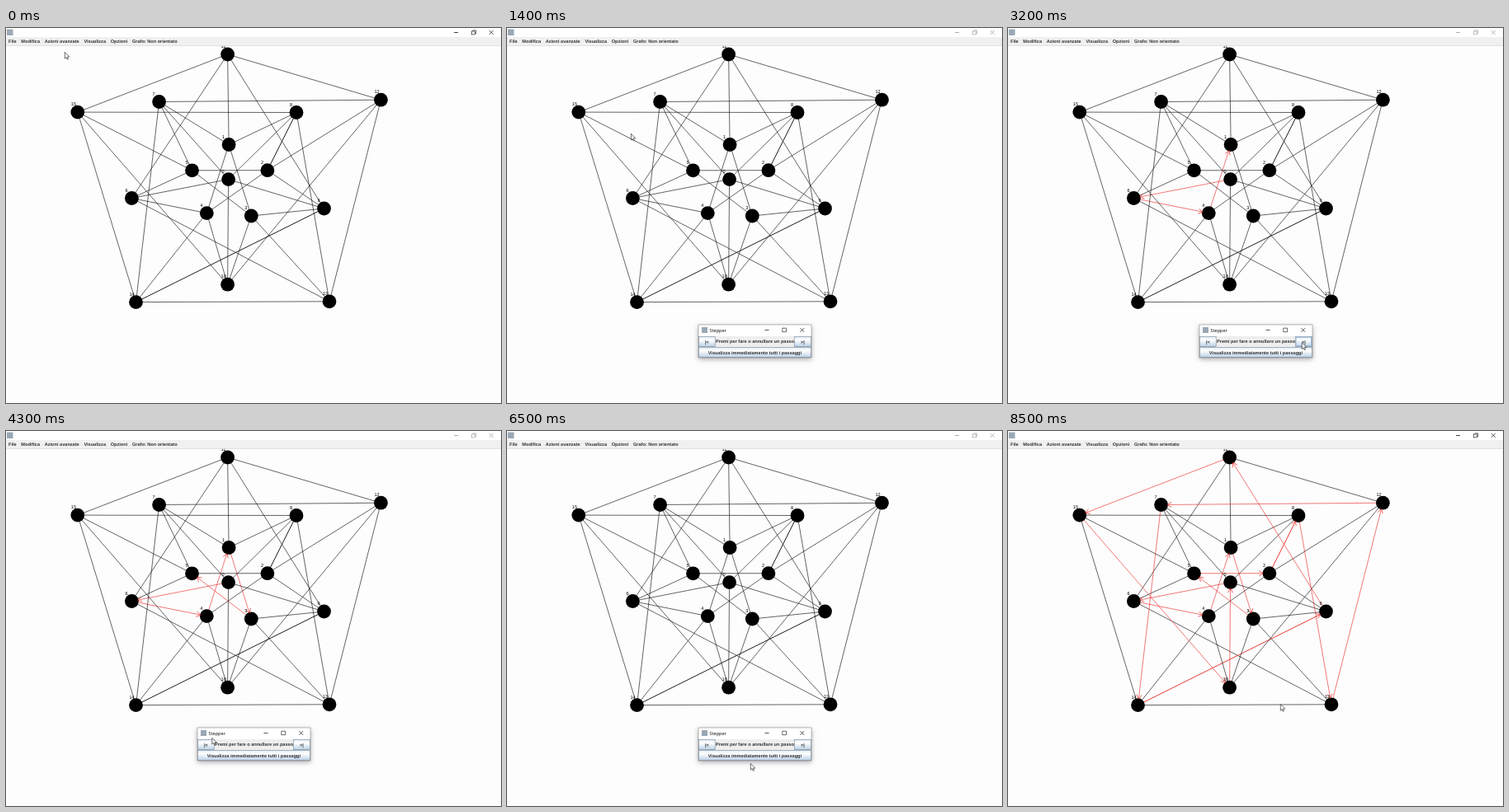
An HTML page with a canvas for the animation above (8.6 s loop, 600 px wide and 455 px high).

```html
<!DOCTYPE html>
<html lang="it">
<head>
<meta charset="utf-8">
<title>Grafo</title>
<style>
html, body { margin: 0; width: 100%; height: 100%; overflow: hidden; background: #fefdfe; }
canvas { display: block; width: 600px; height: 455px; }
</style>
</head>
<body>
<canvas id="stage"></canvas>
<script>
const W = 600, H = 455, LOOP = 8600, STEP = 100;
const canvas = document.getElementById('stage');
const ctx = canvas.getContext('2d');
const ratio = window.devicePixelRatio || 1;
canvas.width = W * ratio;
canvas.height = H * ratio;

const SANS = '"Liberation Sans", Arial, sans-serif';
const BOLD = `bold 5.6px ${SANS}`;
const PLAIN = `5.6px ${SANS}`;
const RED = '#e8302c', BLUE = '#a3b8cc', EDGE = '#7a8a99', ICON = '#9aa8b5';

// Hand-placed nodes: hub, inner ring, middle ring, outer ring
const nodes = [
  [269.6, 183.6],
  [270.1, 141.5], [316.9, 172.7], [297.3, 228], [243.3, 224.6], [225.5, 172.8],
  [152.4, 206.5], [185.6, 89.5], [352, 102.5], [385.5, 219], [268.6, 311.2],
  [268.6, 32], [454.4, 87.2], [392, 331.8], [157.5, 332.6], [86.8, 102.1]
];
const heavy = ['2-8', '9-14'];
const key = (a, b) => Math.min(a, b) + '-' + Math.max(a, b);
const edges = buildEdges();
const circuit = buildCircuit();

// [arrival time, x, y] of the pointer; every move takes at most MOVE ms
const MOVE = 600;
const stops = [
  [0, 71.3, 29.3], [300, 70, 16], [900, 78.3, 39.4], [1800, 356.3, 381.7], [4300, 249.8, 372.3],
  [4700, 242, 380], [6500, 295.3, 403.4], [6800, 318, 392], [7300, 362.3, 366.4], [8100, 330.3, 331.4]
];

const MENU = ['File', 'Modifica', 'Azioni avanzate', 'Visualizza', 'Opzioni', 'Grafo: Non orientato'];
const ITEMS = ['Aggiungi un nodo con un nome specifico', 'Trova circuito hamiltoniano',
  'Trova circuito euleriano', 'Trova il cammino più breve tra 2 nodi',
  'Controlla se bipartito', 'Trova arborescenza'];
const ROW = { top: 21.8, pitch: 11.65 };

const clamp = (v, lo, hi) => Math.max(lo, Math.min(hi, v));

// Each ring has five nodes; links repeat around the rings
function buildEdges() {
  const inner = i => 1 + i % 5, middle = i => 6 + i % 5, outer = i => 11 + i % 5;
  const list = [];
  for (let i = 0; i < 5; i++) {
    list.push(
      [0, middle(i)], [inner(i), inner(i + 2)], [outer(i), outer(i + 1)], [inner(i), outer(i)],
      [middle(i), inner(i + 3)], [middle(i), inner(i + 4)],
      [middle(i), outer(i)], [middle(i), outer(i + 2)]
    );
  }
  return list;
}

// Always walk on to the lowest unvisited neighbour, then return to the hub
function buildCircuit() {
  const walk = [0];
  for (;;) {
    const here = walk[walk.length - 1];
    const next = edges.filter(e => e.includes(here))
      .map(([a, b]) => a + b - here)
      .filter(n => !walk.includes(n));
    if (!next.length) return [...walk, 0];
    walk.push(Math.min(...next));
  }
}

// Five steps forward, five back, then the whole circuit
function shownSteps(t) {
  if (t >= 6800) return circuit.length - 1;
  const clicks = (start, gap) => clamp(Math.floor((t - start) / gap) + 1, 0, 5);
  return clicks(2200, 400) - clicks(4700, 300);
}

function pointerAt(t) {
  const i = stops.findIndex(s => s[0] >= t);
  if (i <= 0) return stops[i < 0 ? stops.length - 1 : 0].slice(1);
  const [t0, x0, y0] = stops[i - 1], [t1, x1, y1] = stops[i];
  const leave = Math.max(t0, t1 - MOVE);
  const u = clamp((t - leave) / (t1 - leave), 0, 1), k = u * u * (3 - 2 * u);
  return [x0 + (x1 - x0) * k, y0 + (y1 - y0) * k];
}

function fill(x, y, w, h, color) {
  ctx.fillStyle = color;
  ctx.fillRect(x, y, w, h);
}

function frame(x, y, w, h, color, width = 0.6) {
  ctx.strokeStyle = color;
  ctx.lineWidth = width;
  ctx.strokeRect(x, y, w, h);
}

function text(s, x, y, font = BOLD, color = '#333', align = 'left') {
  ctx.font = font;
  ctx.fillStyle = color;
  ctx.textAlign = align;
  ctx.fillText(s, x, y);
}

function path(points, color, width) {
  ctx.beginPath();
  points.forEach(([x, y]) => ctx.lineTo(x, y));
  ctx.strokeStyle = color;
  ctx.lineWidth = width;
  ctx.stroke();
}

function cross(x, y, r, color) {
  path([[x - r, y - r], [x + r, y + r]], color, 0.7);
  path([[x + r, y - r], [x - r, y + r]], color, 0.7);
}

function arrow(from, to) {
  const [ax, ay] = nodes[from], [bx, by] = nodes[to];
  const a = Math.atan2(by - ay, bx - ax);
  const tip = [bx - 7.5 * Math.cos(a), by - 7.5 * Math.sin(a)];
  const arm = d => [tip[0] - 6 * Math.cos(a + d), tip[1] - 6 * Math.sin(a + d)];
  path([arm(0.55), tip, arm(-0.55)], RED, 0.75);
}

function drawGraph(count) {
  const steps = circuit.slice(0, count).map((n, i) => [n, circuit[i + 1]]);
  const used = steps.map(([a, b]) => key(a, b));
  edges.forEach(([a, b]) => {
    const id = key(a, b);
    path([nodes[a], nodes[b]], used.includes(id) ? RED : '#111', heavy.includes(id) ? 0.95 : 0.65);
  });
  nodes.forEach(([x, y]) => {
    ctx.beginPath();
    ctx.arc(x, y, 8.4, 0, 2 * Math.PI);
    ctx.fillStyle = '#000';
    ctx.fill();
  });
  steps.forEach(([a, b]) => arrow(a, b));
  nodes.forEach(([x, y], i) => text(i, x - 8, y - 8, PLAIN, '#000'));
}

function drawWindow(active) {
  const ink = active ? '#111' : '#999';
  fill(0, 0, W, 11, '#fff');
  fill(1, 1.5, 7.5, 7.5, ICON);
  path([[543, 5.5], [548, 5.5]], ink, 0.8);
  frame(564.6, 4, 3.9, 3.9, ink);
  path([[565.9, 4], [565.9, 2.8], [569.7, 2.8], [569.7, 6.7], [568.5, 6.7]], ink, 0.6);
  cross(588.3, 5.4, 2.5, ink);
  fill(0, 11, W, 10.5, '#f0f0f0');
  fill(0, 21.2, W, 0.6, '#d4d4d4');
}

function drawMenu(open, selected) {
  let x = 3;
  MENU.forEach((s, i) => {
    ctx.font = BOLD;
    const w = ctx.measureText(s).width;
    if (open && i === 2) {
      fill(x - 3, 11.2, w + 5.6, 10.3, BLUE);
      frame(x - 2.8, 11.4, w + 5.2, 10, EDGE);
    }
    text(s, x, 18.4);
    x += w + 5.7;
  });
  if (!open) return;
  ITEMS.forEach((s, i) => {
    const y = ROW.top + i * ROW.pitch;
    fill(44, y, 117.5, ROW.pitch, i === selected ? BLUE : '#eee');
    frame(44.3, y, 117, ROW.pitch, '#7f9bc0');
    text(s, 47, y + 7.9);
  });
}

function button(x, y, w, h, label, hover, focus) {
  const g = ctx.createLinearGradient(0, y, 0, y + h);
  ['#dde8f3', '#fff', '#dde8f3', '#b8cfe5'].forEach((c, i) => g.addColorStop(i / 3, c));
  fill(x, y, w, h, g);
  frame(x + 0.3, y + 0.3, w - 0.6, h - 0.6, EDGE);
  if (hover) frame(x + 1.1, y + 1.1, w - 2.2, h - 2.2, '#9dbbdb', 1);
  text(label, x + w / 2, y + h / 2 + 2.1, BOLD, '#333', 'center');
  if (focus) frame(x + 10.5, y + 2.7, w - 21.5, h - 5.4, BLUE, 0.5);
}

function drawDialog(t, [px, py]) {
  const x = 232, y = 360, w = 137, h = 40;
  const rowButton = (bx, by, bw, label, focus) => {
    const hover = px >= bx && px < bx + bw && py >= by && py < by + 12.5;
    button(bx, by, bw, 12.5, label, hover, focus);
  };
  ctx.save();
  ctx.shadowColor = 'rgba(0,0,0,.32)';
  ctx.shadowBlur = 6 * ratio;
  ctx.shadowOffsetY = 1.5 * ratio;
  fill(x, y, w, h, '#fff');
  ctx.restore();
  fill(x, y + 14, w, h - 14, '#eee');
  fill(x + 4, y + 3, 7, 7, ICON);
  text('Stepper', x + 13.6, y + 8.8, '5.5px "Open Sans", sans-serif', '#000');
  path([[x + 80.5, y + 6.5], [x + 85.5, y + 6.5]], '#111', 0.7);
  frame(x + 101.9, y + 4.1, 4.7, 4.7, '#111');
  const hot = t >= 7300;
  if (hot) fill(x + 115.7, y + 0.3, 21, 13.5, t < 7400 ? '#f38389' : '#e81123');
  cross(x + 125.8, y + 6.5, 2.4, hot ? '#fff' : '#111');

  rowButton(x + 0.2, y + 14.2, 20.3, '|<');
  text('Premi per fare o annullare un passo', x + 21, y + 22.4);
  rowButton(x + 116, y + 14.2, 20.6, '>|');
  rowButton(x + 0.2, y + 27.2, 136.4, 'Visualizza immediatamente tutti i passaggi', t >= 6800);
  frame(x, y, w, h, '#777', 0.5);
}

function drawPointer([x, y]) {
  const shape = [[0, 0], [0, 7.8], [1.8, 6.2], [3, 8.9], [4.2, 8.4], [3, 5.8], [5.5, 5.7]];
  ctx.beginPath();
  shape.forEach(([dx, dy]) => ctx.lineTo(x + dx, y + dy));
  ctx.closePath();
  ctx.fillStyle = '#fff';
  ctx.fill();
  ctx.strokeStyle = '#222';
  ctx.lineWidth = 0.65;
  ctx.stroke();
}

function draw(t) {
  const pointer = pointerAt(t);
  const dialog = t >= 1200 && t < 7600;
  const menu = t >= 300 && t < 1100;

  ctx.setTransform(ratio, 0, 0, ratio, 0, 0);
  ctx.textRendering = 'geometricPrecision';
  fill(0, 0, W, H, '#fefdfe');
  drawGraph(shownSteps(t));
  drawWindow(!dialog);
  drawMenu(menu, Math.floor((pointer[1] - ROW.top) / ROW.pitch));
  if (dialog) drawDialog(t, pointer);
  drawPointer(pointer);
}

const start = performance.now();
function tick() {
  const t = (performance.now() - start) % LOOP;
  draw(Math.floor(t / STEP) * STEP);
  requestAnimationFrame(tick);
}
tick();
</script>
</body>
</html>
```
